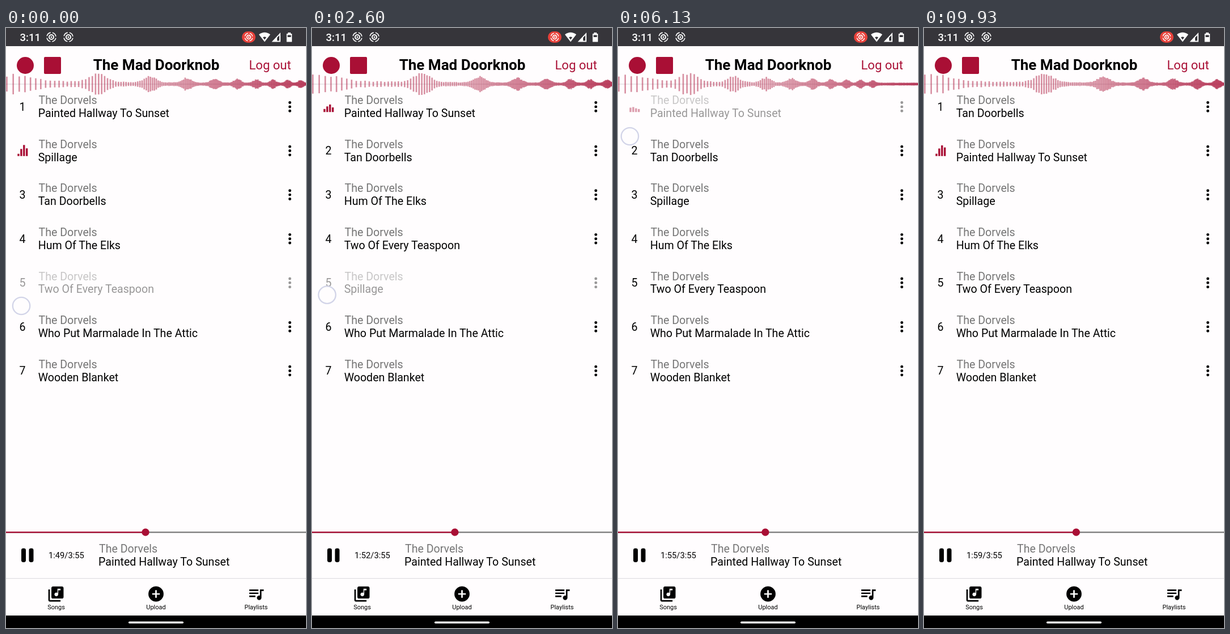
Write an HTML page with a canvas that moves like this. It is 529x1058 px and loops after 9.99 s.

```html
<!DOCTYPE html>
<html lang="en">
<head>
<meta charset="utf-8">
<title>Music player</title>
<style>
  html, body { margin: 0; width: 100%; height: 100%; overflow: hidden; background: #fffdfe; }
  canvas, svg { position: absolute; left: 0; top: 0; width: 529px; height: 1058px; }
  text { font-family: Roboto, sans-serif; font-size: 19.6px; fill: #000; white-space: pre; }
  .artist { fill: #757575; }
  .mid { text-anchor: middle; }
  .nav { font-size: 11px; text-anchor: middle; }
  .red { fill: #a90f35; }
</style>
</head>
<body>
<canvas id="wave" width="529" height="1058"></canvas>
<svg viewBox="0 0 529 1058">
  <defs>
    <g id="cast" fill="none" stroke="#fff">
      <circle r="4" stroke-width="2"/>
      <circle r="1.5" fill="#fff" stroke="none"/>
      <circle r="8" stroke-width="1.6" stroke-dasharray="9.4 3.17" stroke-dashoffset="-1.6"/>
    </g>
  </defs>

  <rect width="529" height="32" fill="#36353a"/>
  <text x="24.5" y="23" style="font-size:18.5px;font-weight:500;fill:#fff">3:11</text>
  <use href="#cast" x="80" y="16"/>
  <use href="#cast" x="110" y="16"/>
  <rect x="416" y="6" width="24" height="20" rx="10" fill="#e8413a"/>
  <use href="#cast" transform="translate(428 16) scale(.85)"/>
  <path d="M446 11.5Q456 4 466 11.5L456 24.5Z" fill="#fff"/>
  <path d="M453 16.5Q456 14.5 459 16.5L456 20.5Z" fill="#36353a"/>
  <path d="M484 8V24.5H468.5Z" fill="#fff"/>
  <path d="M482 13V22.5H478V17Z" fill="#36353a"/>
  <path d="M497 8h5v2h2.2v14.5h-9.4v-14.5h2.2z" fill="#fff"/>
  <path d="M496.5 12.5h6v3.5h-6z" fill="#36353a"/>

  <circle class="red" cx="34" cy="66" r="15"/>
  <rect class="red" x="67" y="51" width="30" height="30" rx="2"/>
  <text class="mid" x="265" y="74" style="font-size:26px;font-weight:700">The Mad Doorknob</text>
  <text class="red" x="428.5" y="72.5" style="font-size:22px">Log out</text>

  <g id="rows"></g>

  <rect y="888" width="529" height="2.4" fill="#808080"/>
  <rect id="played" class="red" y="888" height="2.4"/>
  <circle id="knob" class="red" cy="889.2" r="6.6"/>
  <rect x="27" y="917.5" width="8" height="24.5" rx="3.4"/>
  <rect x="40.5" y="917.5" width="8" height="24.5" rx="3.4"/>
  <text id="clock" x="75" y="935" style="font-size:14.7px"></text>
  <text class="artist" x="164" y="925">The Dorvels</text>
  <text x="163" y="948">Painted Hallway To Sunset</text>

  <rect y="970" width="529" height="1.2" fill="#dfdde2"/>
  <path transform="translate(72 982) scale(1.34)" d="M20 2H8c-1.1 0-2 .9-2 2v12c0 1.1.9 2 2 2h12c1.1 0 2-.9 2-2V4c0-1.1-.9-2-2-2zm-2 5h-3v5.5c0 1.38-1.12 2.5-2.5 2.5S10 13.88 10 12.5s1.12-2.5 2.5-2.5c.57 0 1.08.19 1.5.51V5h4v2zM4 6H2v14c0 1.1.9 2 2 2h14v-2H4V6z"/>
  <circle cx="264.5" cy="998" r="13.4"/>
  <path d="M264.5 991.3v13.4M257.8 998h13.4" stroke="#fff" stroke-width="2.7"/>
  <path transform="translate(425 982) scale(1.34)" d="M15 6H3v2h12V6zm0 4H3v2h12v-2zM3 16h8v-2H3v2zM17 6v8.18c-.31-.11-.65-.18-1-.18-1.66 0-3 1.34-3 3s1.34 3 3 3 3-1.34 3-3V8h3V6h-5z"/>
  <text class="nav" x="88.5" y="1024.5">Songs</text>
  <text class="nav" x="264.5" y="1024.5">Upload</text>
  <text class="nav" x="441" y="1024.5">Playlists</text>

  <rect y="1036" width="529" height="22"/>
  <rect x="216" y="1046.5" width="97" height="3.5" rx="1.75" fill="#fff"/>
  <circle id="touch" r="15.2" fill="#fff" fill-opacity=".2" stroke="#d2d4e8" stroke-width="2.3"/>
</svg>
<script>
const LOOP = 9990, STEP = 1000 / 15, STEPS = 150;
const $ = id => document.getElementById(id);

const songs = [
  'Painted Hallway To Sunset', 'Spillage', 'Tan Doorbells', 'Hum Of The Elks',
  'Two Of Every Teaspoon', 'Who Put Marmalade In The Attic', 'Wooden Blanket'
];
const PLAYING = 0;
const rowY = i => 138.7 + 77.6 * i;

// Song index and [ms, finger y] points; the last point is the drop
const drags = [
  { song: 4, path: [[0, 490], [500, 468]] },
  { song: 1, path: [[1150, 222], [1800, 334], [3100, 556], [3470, 504], [4530, 228], [5200, 296]] },
  { song: 0, path: [[5600, 138], [6130, 191], [7200, 408]] },
  { song: 0, path: [[7900, 374], [9500, 190]] }
];

// Screen x of the sounding note over time
const melody = [[0, 163], [1800, 205], [3470, 182], [4530, 188], [6130, 125], [7470, 156], [9930, 212]];

const hash = (a, b) => {
  const v = Math.sin(a * 12.9898 + b * 78.233) * 43758.5453;
  return v - Math.floor(v);
};

// Linear interpolation through [time, value] points
function sample(points, t) {
  let i = 0;
  while (i < points.length - 2 && t >= points[i + 1][0]) i++;
  const [t0, a] = points[i], [t1, b] = points[i + 1];
  return a + (b - a) * Math.min(1, (t - t0) / (t1 - t0));
}

const startOf = d => d.path[0][0];
const endOf = d => d.path[d.path.length - 1][0];
const timeOf = n => Math.round(n * STEP / 10) * 10;
const dragAt = t => drags.filter(d => t >= startOf(d)).pop();

// List order at every step, swapping when the finger passes a neighbour's middle
const order = songs.map((_, i) => i);
const orders = Array.from({ length: STEPS }, (_, n) => {
  const t = timeOf(n), d = dragAt(t);
  if (t < endOf(d)) {
    const y = sample(d.path, t);
    let i = order.indexOf(d.song);
    const swap = j => { order[i] = order[j]; order[j] = d.song; i = j; };
    while (i < 6 && y > rowY(i + 1)) swap(i + 1);
    while (i > 0 && y < rowY(i - 1)) swap(i - 1);
  }
  return order.slice();
});

function add(parent, tag, attrs, text) {
  const el = document.createElementNS('http://www.w3.org/2000/svg', tag);
  for (const k in attrs) el.setAttribute(k, attrs[k]);
  if (text) el.textContent = text;
  return parent.appendChild(el);
}

const rows = songs.map((_, i) => {
  const g = add($('rows'), 'g', { transform: `translate(0 ${rowY(i)})` });
  const num = add(g, 'text', { class: 'mid', x: 29, y: 7 }, String(i + 1));
  add(g, 'text', { class: 'artist', x: 57.5, y: -4.6 }, 'The Dorvels');
  const title = add(g, 'text', { x: 56.7, y: 18.4 });
  for (const k of [-1, 0, 1]) add(g, 'circle', { cx: 500.5, cy: 0.2 + 7.35 * k, r: 2.45 });
  return { g, num, title };
});
const eq = add($('rows'), 'g', { class: 'red' });
const eqBars = [0, 1, 2, 3].map(i => add(eq, 'rect', { x: 20.3 + 4.9 * i, width: 3.4 }));

function eqHeights(t) {
  const a = 2 * Math.PI * t / 900;
  return [10 - 6 * Math.cos(a), 12.5 + 4 * Math.sin(a), 12 + 7.5 * Math.cos(2 * a), 12 + 8 * Math.sin(a + 0.2)];
}

// Logarithmic frequency axis of the spectrum
const toX = f => 215 * Math.log(1 + f / 18.7);
const toFreq = x => 18.7 * (Math.exp(x / 215) - 1);
const bell = (x, mid, w) => Math.exp(-(((x - mid) / w) ** 2) / 2);
const ctx = $('wave').getContext('2d');

// A falling floor, a bass hump, and the harmonics of the current note
function level(x, note) {
  let h = 1.8 + 4.5 * Math.exp(-x / 220) + 10 * bell(x, 15, 32);
  for (let k = 1; k <= 9; k++) {
    h += 14 / k ** 0.5 * bell(x, toX(k * note), 15 / k ** 0.6);
  }
  return h;
}

function drawWave(t, n) {
  const note = toFreq(sample(melody, t));
  ctx.clearRect(0, 0, 529, 140);
  ctx.fillStyle = '#d9d4d8';
  ctx.fillRect(0, 98.5, 529, 1);
  ctx.fillStyle = 'rgba(169,15,53,.46)';
  for (let j = 0; toX(j) < 529; j++) {
    const x = 1.5 + toX(j);
    const h = Math.min(20.5, level(x, note) * (0.85 + 0.3 * hash(j, n)));
    ctx.fillRect(x - 1.3, 98.9 - h, 2.6, 2 * h);
  }
}

function draw(t, n) {
  const list = orders[n], d = dragAt(t), held = t < endOf(d);
  // The marker stays on its old row until the first drop
  const eqRow = t < 600 ? 1 : list.indexOf(PLAYING);

  rows.forEach((r, i) => {
    r.title.textContent = songs[list[i]];
    r.num.style.display = i === eqRow ? 'none' : '';
    r.g.style.opacity = held && list[i] === d.song ? 0.4 : 1;
  });

  eq.setAttribute('transform', `translate(0 ${rowY(eqRow) + 9.5})`);
  eq.style.opacity = rows[eqRow].g.style.opacity;
  eqHeights(t).forEach((h, i) => {
    eqBars[i].setAttribute('y', -h);
    eqBars[i].setAttribute('height', h);
  });

  const y = sample(d.path, t);
  $('touch').setAttribute('cx', 17 + 0.0205 * y);
  $('touch').setAttribute('cy', y);
  $('touch').style.opacity = held ? 1 : Math.max(0, 1 - (t - endOf(d)) / 290);

  const sec = 109.28 + t / 1000, px = sec / 235 * 529, shown = Math.round(sec);
  $('played').setAttribute('width', px);
  $('knob').setAttribute('cx', px);
  $('clock').textContent = `${Math.floor(shown / 60)}:${String(shown % 60).padStart(2, '0')}/3:55`;

  drawWave(t, n);
}

const began = performance.now();
let last = -1;
function tick() {
  const t = (performance.now() - began) % LOOP;
  const n = Math.min(STEPS - 1, Math.floor(t / STEP + 0.06));
  if (n !== last) draw(timeOf(n), last = n);
  requestAnimationFrame(tick);
}
tick();
</script>
</body>
</html>
```
